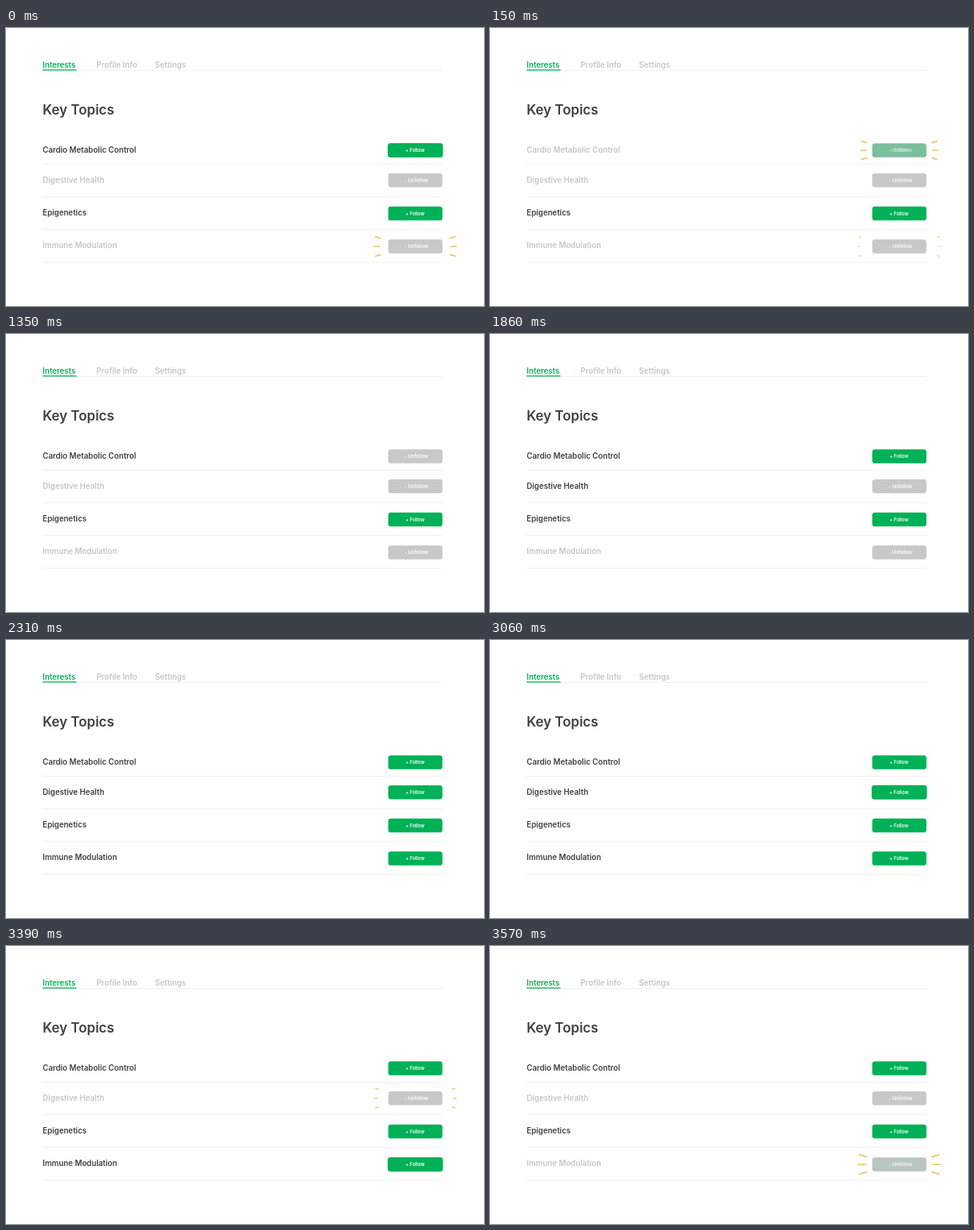
These frames come from a looping animation (600 px wide and 350 px high, 3.6 s). An HTML page:

```html
<!DOCTYPE html>
<html lang="en">
<head>
<meta charset="utf-8">
<style>
  html, body { margin: 0; width: 100%; height: 100%; overflow: hidden; background: #fff; }
  svg { display: block; width: 600px; height: 350px; font: 600 9.75px Inter, sans-serif; }
</style>
</head>
<body>
<svg id="stage" viewBox="0 0 600 350"></svg>
<script>
const LOOP = 3600, STEP = 30;
const GREEN = [0, 177, 87], GRAY = [200, 200, 200];
const DARK = '#3f3f41', PALE = '#c5c5c5';
const stage = document.getElementById('stage');

function add(parent, tag, attrs, text = '') {
  const el = document.createElementNS('http://www.w3.org/2000/svg', tag);
  for (const k in attrs) el.setAttribute(k, attrs[k]);
  el.textContent = text;
  return parent.appendChild(el);
}
const label = (x, y, text, fill, size = 9.75) =>
  add(stage, 'text', { x, y, fill, 'font-size': size }, text);
const rule = y => add(stage, 'path', { d: `M46 ${y}H548`, stroke: '#ececec', 'stroke-width': 0.8 });
const mix = (a, b, p) => `rgb(${a.map((v, i) => Math.round(v + (b[i] - v) * p))})`;
const mod = t => (t % LOOP + LOOP) % LOOP;

// Piecewise linear value through [time, value] points
function track(points, t) {
  if (t <= points[0][0]) return points[0][1];
  for (let i = 1; i < points.length; i++) {
    const [t0, v0] = points[i - 1], [t1, v1] = points[i];
    if (t <= t1) return v0 + (v1 - v0) * (t - t0) / (t1 - t0);
  }
  return points[points.length - 1][1];
}

rule(53.5);
label(46, 50, 'Interests', '#00b157');
label(113.5, 50, 'Profile Info', PALE);
label(187, 50, 'Settings', PALE);
add(stage, 'path', { d: 'M46 52.8H88.5', stroke: '#00b157', 'stroke-width': 1.3 });
label(46, 109, 'Key Topics', DARK, 17);
[171.5, 212.5, 253.5, 295].forEach(rule);

// Rays around a button: inner end and outer end, on the right side
const RAYS = [[41, -9.5, 50, -12.3], [42, 0, 51.5, 0], [41, 9.5, 50, 12.3]];

function topic(name, textY, y, on, off) {
  const title = label(46, textY, name, DARK);
  const button = add(stage, 'g', {});
  const box = add(button, 'rect', { x: -34, y: -8.8, width: 68, height: 17.6, rx: 3.4 });
  const words = { y: 2.1, fill: '#fff', 'font-size': 5.85, 'text-anchor': 'middle' };
  const follow = add(button, 'text', { x: -0.4, ...words }, '+ Follow');
  const unfollow = add(button, 'text', { x: 1.4, ...words }, '- Unfollow');
  const rays = add(stage, 'path', {
    transform: `translate(513.8 ${y})`, stroke: '#f3bd5b', 'stroke-linecap': 'round', fill: 'none'
  });

  return time => {
    const a = mod(time - on), b = mod(time - off);
    const followed = on !== undefined && a < b;
    let gray = 0, scale = 1, d = '';
    if (followed) {
      gray = track([[90, 0], [180, 0.92], [210, 1]], a);
      scale = track([[0, 1.02], [45, 1.03], [150, 1]], a);
      const tip = track([[90, 0], [180, 1]], a);
      const tail = track([[180, 0], [210, 0.28], [330, 0.62], [390, 1]], a);
      if (tip > tail) {
        for (const [x0, y0, x1, y1] of RAYS) {
          const at = (p, s) => `${s * (x0 + (x1 - x0) * p)} ${y0 + (y1 - y0) * p}`;
          for (const s of [-1, 1]) d += `M${at(tail, s)}L${at(tip, s)}`;
        }
      }
      rays.setAttribute('stroke-width', track([[180, 1.6], [390, 1.1]], a));
    } else if (off !== undefined) {
      gray = track([[0, 1], [120, 0]], b);
      scale = track([[0, 1], [60, 1.025], [120, 1]], b);
    }
    title.setAttribute('fill', followed && a >= 120 ? PALE : DARK);
    box.setAttribute('fill', mix(GREEN, GRAY, gray));
    follow.setAttribute('opacity', 1 - gray);
    unfollow.setAttribute('opacity', gray);
    button.setAttribute('transform', `translate(513.8 ${y}) scale(${scale})`);
    rays.setAttribute('d', d);
  };
}

const topics = [
  topic('Cardio Metabolic Control', 156.5, 154, 0, 1350),
  topic('Digestive Health', 194.5, 191.7, 3060, 1860),
  topic('Epigenetics', 235.5, 233.5),
  topic('Immune Modulation', 277, 275, 3390, 2190)
];

const start = performance.now();
function frame(now) {
  const t = Math.floor(mod(Math.max(0, now - start)) / STEP) * STEP;
  topics.forEach(draw => draw(t));
  requestAnimationFrame(frame);
}
frame(start);
</script>
</body>
</html>
```
